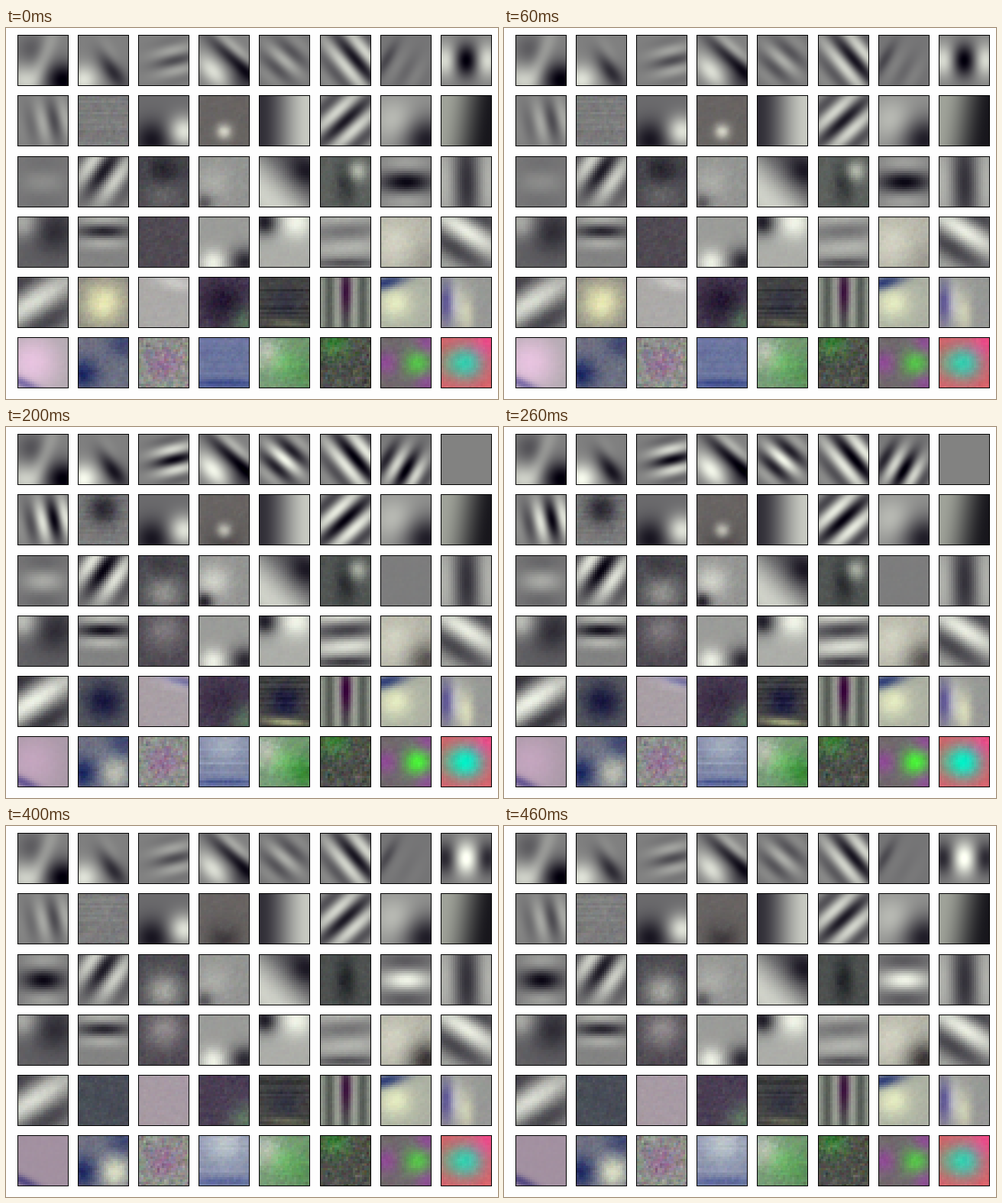
Recreate the animation shown at these times as a matplotlib script. Size 644 by 486 pixels, loop 500 ms.

```python
import numpy as np
import matplotlib.pyplot as plt
from matplotlib.animation import FuncAnimation

W, H, DPI = 644, 486, 64  # a power of two keeps the pixel grid exact
STEPS, STEP_MS = 5, 100
SIDE, PITCH, COLS, CELLS = 65, 79.2, 8, 22

T = np.arange(STEPS)


def peak(when, width):
    return np.exp(-((T - when) / width) ** 2)


# Strength of a feature over the loop
BELL = peak(2, 2.1)
MILD = 1 - .05 * (T - 2) ** 2
FLIP = np.sin(np.pi * (T - 2) / 4)
RISE = np.sqrt(T / 4)
FALL = 1 - T / 4

# Weights of a feature on red, green and blue
GREY = (1, 1, 1)
GREEN = (-.3, 1, -.4)
PURPLE = (.6, -.6, .8)
CREAM = (1, 1, .6)
NAVY = (1, .9, .4)
PINK = (1, .5, .9)

tiles = []


def place(where):
    """Compass letters to a point: capitals near the edge, small ones halfway."""
    step = {"N": (0, -.4), "S": (0, .4), "W": (-.4, 0), "E": (.4, 0),
            "n": (0, -.22), "s": (0, .22), "w": (-.22, 0), "e": (.22, 0), "C": (0, 0)}
    return .5 + sum(np.array(step[c]) for c in where)


def turned(u, v, where, deg):
    x, y = place(where)
    c, s = np.cos(np.radians(deg)), np.sin(np.radians(deg))
    return (u - x) * c + (v - y) * s, (v - y) * c - (u - x) * s


def layer(amp, shape, tint):
    amp = np.broadcast_to(amp, STEPS)[:, None, None, None]
    return amp * shape[None, :, :, None] * np.array(tint)


def bar(deg, where, amp, width=.1, length=.3, tint=GREY):
    def draw(u, v):
        a, b = turned(u, v, where, deg)
        return layer(amp, np.exp(-((a / length) ** 2 + (b / width) ** 2) / 2), tint)
    return draw


def spot(where, amp, size=.22, tint=GREY):
    return bar(0, where, amp, size, size, tint)


def wave(deg, where, amp, cycles=2, across=.3, along=.3):
    """Stripes along deg that fade away from their centre."""
    def draw(u, v):
        a, b = turned(u, v, where, deg)
        fade = np.exp(-((a / along) ** 2 + (b / across) ** 2) / 2)
        return layer(amp, fade * np.cos(2 * np.pi * cycles * b), GREY)
    return draw


def ramp(deg, amp):
    return lambda u, v: layer(amp, np.sin(np.pi * turned(u, v, "C", deg)[0]), GREY)


def level(amp, tint=GREY):
    return lambda u, v: layer(amp, np.ones_like(u), tint)


def grain_field(rng):
    """Mixed grey and colour speckle, partly fixed and partly changing."""
    def speckle(n):
        raw = rng.normal(size=(n, CELLS, CELLS, 3)) + rng.normal(size=(n, CELLS, CELLS, 1))
        return .6 * raw + .3 * (np.roll(raw, 1, 1) + np.roll(raw, 1, 2))
    return .8 * speckle(1) + .5 * speckle(STEPS)


def tile(*parts, base=128, grain=None, rows=0):
    row = len(tiles) // COLS
    rng = np.random.default_rng(len(tiles))
    pick = np.arange(SIDE) * CELLS // SIDE
    n = SIDE if row < 2 else CELLS
    axis = (np.arange(n) + .5) / n
    u, v = np.meshgrid(axis, axis)
    img = np.asarray(base) + sum(part(u, v) for part in parts)
    if row < 5:  # light turns cream, dark turns violet
        img = img + (img - 128) * np.array([0, .03, -.08])
    if n == CELLS:
        img = img[:, pick][:, :, pick]
    grain = max(0, row - 1) * .8 if grain is None else grain
    noise = grain * grain_field(rng) + rows * rng.normal(size=(STEPS, CELLS, 1, 1))
    img = img + noise[:, pick][:, :, pick]
    tiles.append(np.clip(img, 0, 255).astype(np.uint8))


# Row 1: oriented edges and bars
tile(spot("nw", -45 * MILD), bar(-70, "C", 45, .12, .5), spot("SW", 75), spot("SE", -130, .25))
tile(spot("SW", 120 * MILD), bar(55, "se", -120 * MILD, .14), bar(60, "e", 35))
tile(wave(-13, "e", -120 * BELL, 2.2, .25))
tile(bar(48, "sw", 115 * MILD, .15), bar(42, "e", -120 * MILD, .11, .5),
     bar(42, "ne", 75 * MILD, .09, .4), spot("SE", -60))
tile(wave(42, "C", 120 * BELL), base=122)
tile(wave(50, "e", -130 * MILD, 1.9, .35, .5))
tile(wave(-60, "s", -125 * peak(1.8, 1.2), 2.1), bar(-60, "W", -40, .08), base=118)
tile(wave(90, "C", 130 * FLIP, 1.05, .5, .23), base=130)

# Row 2
tile(wave(78, "e", -120 * BELL, 2, .35))
tile(spot("n", 90 * (peak(3, .6) - peak(2, .6))), base=124, grain=4, rows=3)
tile(spot("Sw", -85, .28), spot("sE", 120), base=108)
tile(spot("s", 135 * peak(1, 2), .11), spot("S", -45 * RISE), base=(104, 101, 96), grain=2)
tile(ramp(0, 75), base=125)
tile(wave(-43, "C", -125 * MILD, 1.9, .4, .5))
tile(spot("SE", -115, .33), spot("w", 45, .3), base=145)
tile(ramp(8, -68), base=(92, 94, 88))

# Row 3
tile(wave(0, "C", 120 * (peak(1.2, .9) - peak(3.7, 1)), 1, .3, .28), base=120)
tile(wave(-55, "n", -125 * MILD, 1.6, .4, .4))
tile(spot("s", 30 + 60 * RISE, .25), spot("n", -40 * FALL), base=75, grain=4)
tile(spot("w", 60 * BELL), spot("SW", -100 * BELL - 20, .12), base=148, grain=3)
tile(ramp(-45, -65), spot("nE", -50), base=142)
tile(spot("ne", 135 * peak(1, 1.6), .14), bar(90, "C", -45, .13), level(-15 * RISE),
     base=(92, 97, 90), grain=3)
tile(wave(0, "C", 115 * FLIP, 1, .28, .35), base=125)
tile(wave(89, "C", -75, 1, .5, .7), base=128)

# Row 4
tile(spot("NW", 95 * MILD), spot("ne", -50, .3), base=97)
tile(wave(0, "n", -115 * MILD, 1.7, .2, .35), base=132)
tile(spot("n", 65 * RISE, .25), base=(80, 76, 79), grain=4)
tile(spot("Sw", 85, .18), spot("SE", -115, .2), base=155)
tile(spot("NW", -140, .18), spot("Ne", 70), base=172)
tile(wave(-4, "n", -80 * BELL, 1.5, .6, .5), bar(0, "S", -50, .06, .5), base=150)
tile(spot("SE", -25 - 100 * RISE, .26), spot("w", 30, .3), base=(180, 178, 170), grain=3)
tile(wave(33, "n", 95, 1.1, .5, .6), base=138)

# Row 5
tile(wave(-33, "w", 105 * MILD, .95, .6, .7), base=132)
tile(spot("C", 95 * peak(0, .8) - 80 * peak(2.3, .9), .28, CREAM),
     level(-60 * RISE, (1.1, .95, .75)), base=(140, 137, 130), grain=4)
tile(bar(15, "Ne", 60 * peak(1, 1.3)), bar(10, "NE", -110 * peak(1.5, .8), .07, tint=NAVY),
     level(-15 * RISE, (.3, 1, .3)), base=(172, 169, 172))
tile(spot("C", -40 * FALL, .3), spot("SE", 55, tint=(.4, 1, .3)), base=(74, 64, 80), grain=5)
tile(spot("C", -45 * BELL, tint=(1, 1, .2)), bar(5, "S", 100 * BELL, .06, .3, CREAM),
     base=(66, 68, 60), grain=4, rows=6)
tile(wave(90, "C", -40, 3, .5, 1), bar(90, "n", -70 * MILD, .09, tint=(.4, 1.2, .4)),
     base=(118, 124, 114))
tile(bar(-15, "NW", -130, tint=NAVY), spot("w", 55, tint=CREAM), base=(174, 177, 167))
tile(bar(90, "W", -70, tint=(.9, 1, .1)), bar(90, "w", 45), bar(90, "s", 60 * MILD, tint=CREAM),
     base=152)

# Row 6: colour fields
tile(spot("w", 60 * FALL, .4, PINK), level(-15 * RISE, (.6, 1.4, .6)),
     bar(25, "SW", -80, .07, tint=NAVY), base=(172, 166, 170), grain=1)
tile(spot("se", 110 * RISE, tint=CREAM), spot("sW", -80, tint=NAVY), spot("NE", -50, tint=NAVY),
     base=(112, 115, 132), grain=5)
tile(spot("C", -32, tint=GREEN), base=(142, 148, 140), grain=11)
tile(spot("N", 60 * RISE, .35, CREAM), level(20 * RISE, NAVY), bar(0, "S", -45, .06, .6, NAVY),
     base=(108, 118, 160), grain=4, rows=4)
tile(spot("nW", 70, .25, PINK), spot("C", 28, tint=GREEN), spot("sE", -55 * BELL, tint=(1, .3, 1)),
     base=(112, 150, 112), grain=6)
tile(spot("Nw", 45, tint=GREEN), base=(78, 80, 77), grain=10)
tile(spot("e", 85 + 55 * peak(2, 1.4), .18, GREEN), *[spot(w, 50, .16, PURPLE) for w in ("W", "NE", "SE")],
     base=(112, 105, 108))
tile(spot("C", 140 + 65 * peak(2, 1.6), .24, (-1, .7, .46)), spot("W", 50, tint=(-1, .7, .2)),
     spot("NE", 35, tint=PURPLE), base=(220, 92, 104))


def sheet(step):
    page = np.full((H, W, 3), 254, np.uint8)
    for i, pics in enumerate(tiles):
        row, col = divmod(i, COLS)
        x, y = int(15 + PITCH * col), int(9.7 + PITCH * row)
        page[y:y + SIDE + 2, x:x + SIDE + 2] = 0
        page[y + 1:y + 1 + SIDE, x + 1:x + 1 + SIDE] = pics[step]
    return page


pages = [sheet(k) for k in range(STEPS)]
fig = plt.figure(figsize=(W / DPI, H / DPI), dpi=DPI)
ax = fig.add_axes([0, 0, 1, 1])
ax.axis("off")
view = ax.imshow(pages[0], interpolation="nearest", aspect="auto")


def update(step):
    view.set_data(pages[step % STEPS])
    return (view,)


anim = FuncAnimation(fig, update, frames=STEPS, interval=STEP_MS, repeat=True, repeat_delay=0)
plt.show()
```
